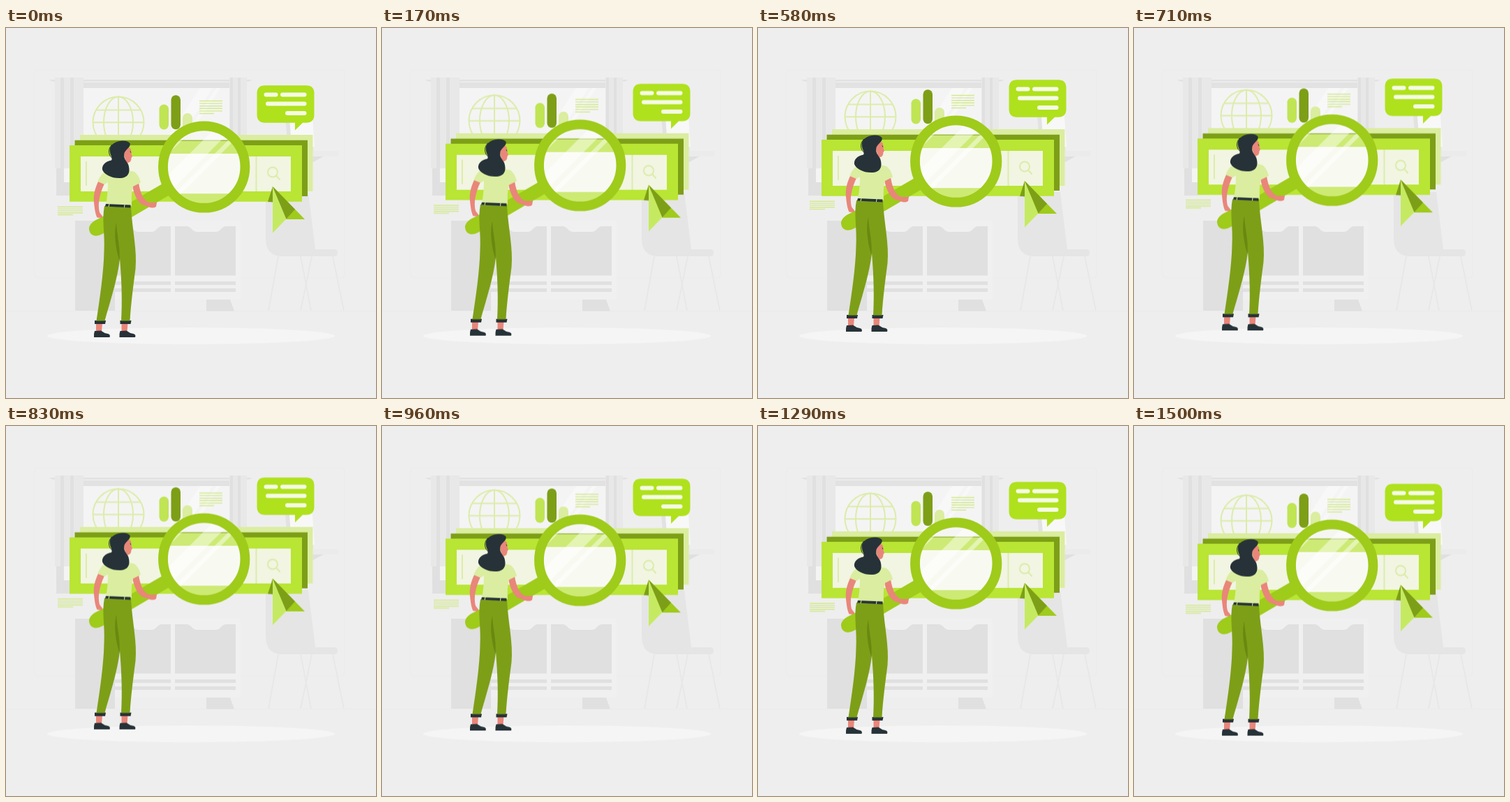
An HTML page that plays this animation: 530x530 px, repeating every 1.54 s.

```html
<!DOCTYPE html>
<html lang="en">
<head>
<meta charset="utf-8">
<title>Search scene</title>
<style>
html, body { margin: 0; width: 100%; height: 100%; overflow: hidden; background: #eee; }
svg { display: block; width: 100%; height: 100%; }
.dark { fill: #7d9f17; }
.mid { fill: #9fcb1b; }
.bright { fill: #b9e534; }
.pale { fill: #dbeda0; }
.skin { fill: #e9867a; }
.ink { fill: #263238; }
.line { fill: none; stroke: #dcecab; stroke-width: 2; }
</style>
</head>
<body>
<svg viewBox="0 0 530 530">
  <defs>
    <clipPath id="glass"><circle cx="283.7" cy="199" r="53"/></clipPath>
    <g id="shoe">
      <path class="skin" d="M129 423h9l-1 12h-8z"/>
      <path class="ink" d="M127 434l9-.5q5 4 10 4.5 4 1 2.500 5H126q-.5-5 1-9z"/>
      <path class="ink" d="M127 419h16l-1 5h-15z"/>
    </g>
  </defs>

  <g id="room">
    <rect x="41" y="60" width="444" height="298" rx="4" fill="none" stroke="#ebebeb"/>
    <path d="M0 405.500H530" stroke="#ebebeb"/>
    <path fill="#f4f4f4" d="M83 86H330V221H83z"/>
    <path fill="#f8f8f8" d="M278 86h18l-44 67h-18zM301 86h6l-44 67h-6z"/>
    <path fill="#e2e2e2" d="M111 78H320v8H111zM62 74H352l-3 2.500H66z"/>
    <path fill="#e8e8e8" d="M70 71h41V201H70zM320 71h25V201H320z"/>
    <path fill="#e0e0e0" d="M78 71h5V201h-5zM92 71h5V201h-5zM321 71h4V201h-4zM332 71h4V201h-4zM72 201h11v20h8v19H72z"/>
    <path fill="#e2e2e2" d="M398 100h36l6 76h-36z"/>
    <path fill="#f8f8f8" d="M404 100h33l5 70h-33z"/>
    <path fill="#ebebeb" d="M390 176h86v8h-86z"/>
    <path fill="#e0e0e0" d="M438 184h17l-17 9z"/>

    <path fill="#f0f0f0" d="M156 276H336V405H156z"/>
    <path fill="#eee" d="M156 389H336V405H156z"/>
    <path fill="#e0e0e0" d="M99 276h57V405H99zM287 389h34l6 16.500h-40z
      M156 284h18c8 0 8 8 16 8h18c8 0 8-8 16-8h12v70.500h-80z
      M242 284h16c8 0 8 8 16 8h26c8 0 8-8 16-8h13v70.500h-87z
      M156 363h80v5h-80zM242 363h87v5h-87zM156 373h80v5h-80zM242 373h87v5h-87z"/>

    <path fill="none" stroke="#e7e7e7" stroke-width="1.800" d="M390 327L376 405M422 327L437 405M438 327L422 405M468 327L484 405"/>
    <path fill="#e5e5e5" d="M372 235V303q1 24 24 24h74q5 0 5-5t-5-5H443L433 235z"/>
    <ellipse cx="265" cy="441" rx="206" ry="12" fill="#f5f5f5"/>
  </g>

  <g id="float">
    <g class="line">
      <circle cx="161" cy="135" r="36.500"/>
      <ellipse cx="161" cy="135" rx="21" ry="36.500"/>
      <path d="M161 98.500V171M124.500 135.300H197.500M129 117.500H193"/>
    </g>
    <rect x="219.500" y="109.500" width="13.500" height="36" rx="6.700" fill="#c0e554"/>
    <rect class="dark" x="236.500" y="96.300" width="13.500" height="49" rx="6.700"/>
    <rect class="pale" x="253" y="122" width="14" height="40" rx="6.700"/>
    <g id="notes" stroke="#d3e98f" stroke-width="1.400"></g>

    <path class="pale" d="M106 153H439.500V234H106z"/>
    <path class="dark" d="M98.500 160.800H432V241H98.500z"/>
    <path class="bright" d="M91 168H424V248.800H91z"/>
    <path fill="#f1f5e2" d="M107 184H408V234H107z"/>
    <path class="line" d="M115 191V226M358.500 184V234"/>
    <path class="line" stroke-width="2.400" d="M375 206.500a7 7 0 1 0 14 0a7 7 0 1 0-14 0M387.500 212l5 5.500"/>

    <path fill="#afe11d" d="M371 82.300H430q11.500 0 11.500 11.500V124q0 11.700-11.500 11.700H425L414 146.500V135.700H371q-11.500 0-11.500-11.700V93.800q0-11.500 11.500-11.500z"/>
    <path stroke="#f5fbe4" stroke-width="6" stroke-linecap="round" d="M372.500 95.500H386.500M396 95.500H427.500M375 108.500H427.500M403 122H427.500"/>

    <path fill="#7d9f17" d="M382 227l-7 22 8 .5z"/>
    <path fill="#c5ea62" d="M382 227V293.500L401.500 273.500z"/>
    <path class="mid" d="M382 227L428 274H401.500z"/>
    <path class="dark" d="M382 227L414 259.700 401.500 273.500z"/>

    <path class="mid" d="M226 222L238 237 180 271 138 295Q127 301 121 294 115 284 127 276L183 247z"/>
    <g clip-path="url(#glass)">
      <circle cx="283.700" cy="199" r="53" fill="#f8f9f5" opacity=".28"/>
      <path fill="#f5f6f2" d="M230 145H338V161H230z"/>
      <path fill="#9dbc45" d="M230 160.500H338V168H230z"/>
      <path fill="#cdea74" d="M230 162H338V180H230z"/>
      <path fill="#f8faf2" d="M230 180H338V237.500H230z"/>
      <path fill="#cdea74" d="M230 237.500H338V254H230z"/>
      <path fill="#fff" opacity=".45" d="M298 145h26L214 255h-26zM334 145h9L233 255h-9zM230 145h38L230 183z"/>
    </g>
    <circle cx="283.700" cy="199" r="58.700" fill="none" stroke="#9fcb1b" stroke-width="13.800"/>

    <use href="#shoe"/>
    <use href="#shoe" x="36.500"/>
    <path class="dark" d="M141 255L179 257C181 290 188 318 185.500 345 182 372 179 395 177.500 419.500H165C166.500 395 166 365 163 330 160 360 148 395 141.500 419.500H129.500C134 390 140 350 140.500 320 142 295 137 275 141 255z"/>
    <path fill="#698811" d="M158 279C154 295 157 315 162.500 334 164 312 159 299 158 279z"/>
    <path class="skin" d="M133 218C127 230 125 240 126 250 127 260 128 266 130.500 271.500L137 272C140 269 136 268 134 264 131 252 134 238 141 223z"/>
    <path class="skin" d="M181 226C184 240 188 248 195 253L204 256Q210 259 215 256L216 250 205 250C198 247 193 240 190 222z"/>
    <path class="pale" d="M141 206C136 210 133 215 131.500 220L141 224 146 221Q146 238 143 253L180 255Q179 238 182 227L193 221.500C191 214 188 209 184 206L175 204Q160 214 146 205z"/>
    <path class="ink" d="M143 252L178.500 253.500V257.500L142 255.500z"/>
    <path stroke="#dbeda0" d="M148 252l-1 4M170 253l-.5 4"/>
    <path class="skin" d="M169 180C169 173 177 168 179 174L179.500 180 181 184 179.500 186Q179.500 192 175 193L172 195z"/>
    <path stroke="#263238" d="M178 176.500l1 2"/>
    <path class="ink" d="M149 172C152 162 171 158 177.500 165 179 171 172 173 169.500 179 168 187 172 190 175 195 178 204 177 212 168 214.500 155 217 141 211 138 203 137 196 143 191 151 189.500 154 186 147 180 149 172z"/>
    <path fill="none" stroke="#263238" d="M152 167C145 173 147 184 153 187"/>
  </g>
</svg>
<script>
const notes = document.getElementById('notes');

function addLines(x, y, width, gap, count, last) {
  let d = '';
  for (let i = 0; i < count; i++) {
    d += `M${x} ${y + i * gap}h${i === count - 1 ? last : width}`;
  }
  const path = document.createElementNS('http://www.w3.org/2000/svg', 'path');
  path.setAttribute('d', d);
  notes.append(path);
}

addLines(277, 104.5, 33, 3.6, 6, 21);
addLines(74, 256.3, 36, 2.8, 5, 22);

// A linear rise and fall, held at 24 pictures per second.
const LOOP = 1540, STEPS = 37, LEAD = 47, TOP = 0.65, RISE = 10.6;

function offsetAt(ms) {
  const phase = ((ms + LEAD) / LOOP) % 1;
  return TOP - RISE * (1 - Math.abs(1 - 2 * phase));
}

const frames = Array.from({ length: STEPS + 1 }, (_, i) => {
  const ms = i * LOOP / STEPS;
  return {
    offset: i === STEPS ? 1 : Math.max(0, ms - 4.5) / LOOP,
    transform: `translateY(${offsetAt(ms).toFixed(3)}px)`,
    easing: 'steps(1, end)'
  };
});

document.getElementById('float').animate(frames, { duration: LOOP, iterations: Infinity });
</script>
</body>
</html>
```
